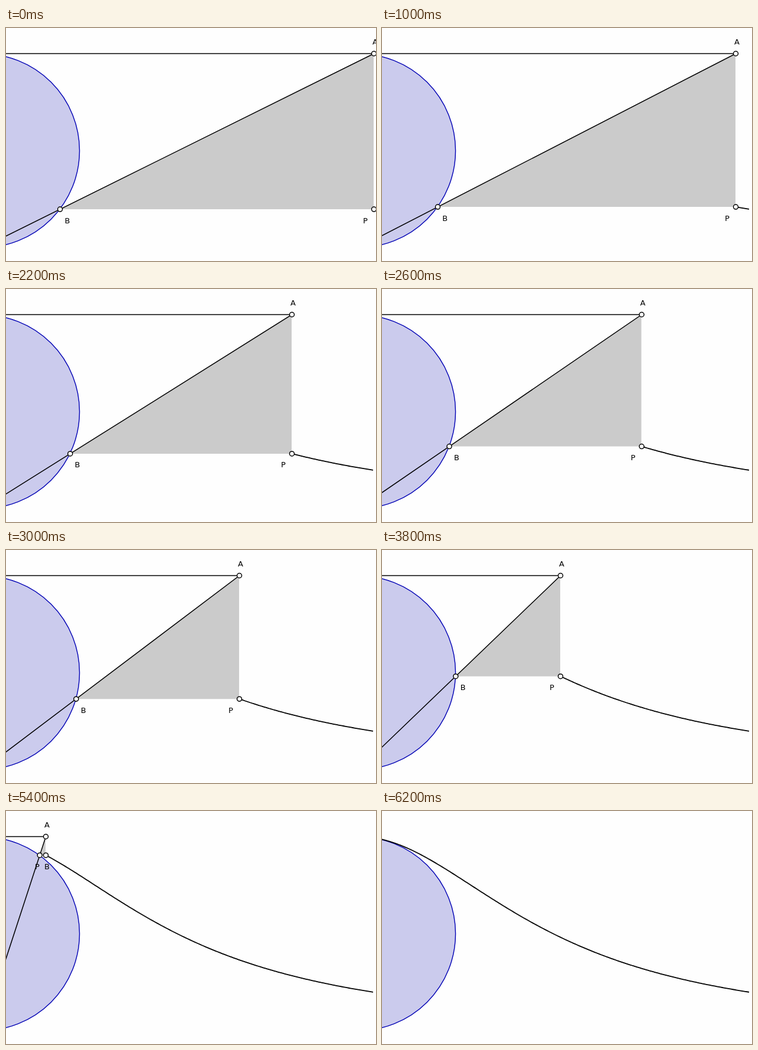
Recreate the animation shown at these times as an HTML page. Size 627 px wide and 396 px high, loop 9.6 s.

```html
<!DOCTYPE html>
<html lang="en">
<head>
<meta charset="utf-8">
<title>Witch curve construction</title>
<style>
html, body { margin: 0; width: 100%; height: 100%; overflow: hidden; background: #fefefe; }
svg { display: block; }
text { font: 13px "DejaVu Sans", sans-serif; text-anchor: middle; }
.line { fill: none; stroke: #000; stroke-width: 1.5; }
.dot { fill: #fff; stroke: #000; stroke-width: 1.5; }
</style>
</head>
<body>
<svg width="627" height="396" viewBox="0 0 627 396">
  <circle cx="-40" cy="208.5" r="164.6" fill="#cbcbed" stroke="#0000b4" stroke-width="1.4"/>
  <path id="area" fill="#cbcbcb"/>
  <path id="rays" class="line"/>
  <path id="trace" class="line" style="stroke-width:1.8"/>
  <circle id="dotA" class="dot" r="4"/>
  <circle id="dotB" class="dot" r="4"/>
  <circle id="dotP" class="dot" r="4"/>
  <text id="textA">A</text>
  <text id="textB">B</text>
  <text id="textP">P</text>
</svg>
<script>
const LOOP = 9600, STEP = 200, LAST = 27;
const ORIGIN = -40, BASE = 373.5, TOP = 43.5, D = BASE - TOP;
// Hand-dragged position of A: [step, x]
const drag = [[0, 623], [1, 599], [6, 514], [7, 484], [11, 395],
  [12, 370], [15, 302], [18, 185], [19, 155], [LAST, -21]];
const el = id => document.getElementById(id);

function dragX(step) {
  const i = Math.max(1, drag.findIndex(k => k[0] >= step));
  const [s0, x0] = drag[i - 1], [s1, x1] = drag[i];
  return x0 + (x1 - x0) * (step - s0) / (s1 - s0) + 0.5;
}

const height = x => D ** 3 / (D * D + (x - ORIGIN) ** 2);

function place(name, x, y, dx, dy) {
  el("dot" + name).setAttribute("cx", x);
  el("dot" + name).setAttribute("cy", y);
  el("text" + name).setAttribute("x", x + dx);
  el("text" + name).setAttribute("y", y + dy);
}

function draw(step) {
  const ax = dragX(step), h = height(ax), y = BASE - h;
  const bx = ORIGIN + (ax - ORIGIN) * h / D;
  el("area").setAttribute("d", `M${ax - 0.5} ${TOP}V${y}H${bx}Z`);
  el("rays").setAttribute("d", `M${ORIGIN} ${TOP}H${ax}L${ORIGIN} ${BASE}`);

  let d = `M${ax} ${y}`;
  for (let x = ax + 3; x < 622; x += 3) d += `L${x} ${BASE - height(x)}`;
  if (step) d += `L622 ${BASE - height(622)}`;
  el("trace").setAttribute("d", d);

  place("A", ax, TOP, 2, -15.5);
  place("B", bx, y, 12.3, 23.5);
  place("P", ax, y, -14.5, 23.5);
}

function tick(now) {
  const t = now % LOOP;
  draw(t < 1000 ? 0 : Math.min(LAST, Math.floor(t / STEP) - 4));
  requestAnimationFrame(tick);
}
draw(0);
let start;
requestAnimationFrame(function begin(now) {
  start = now;
  (function frame(n) {
    const t = Math.max(0, n - start) % LOOP;
    draw(t < 1000 ? 0 : Math.min(LAST, Math.floor(t / STEP) - 4));
    requestAnimationFrame(frame);
  })(now);
});
</script>
</body>
</html>
```
